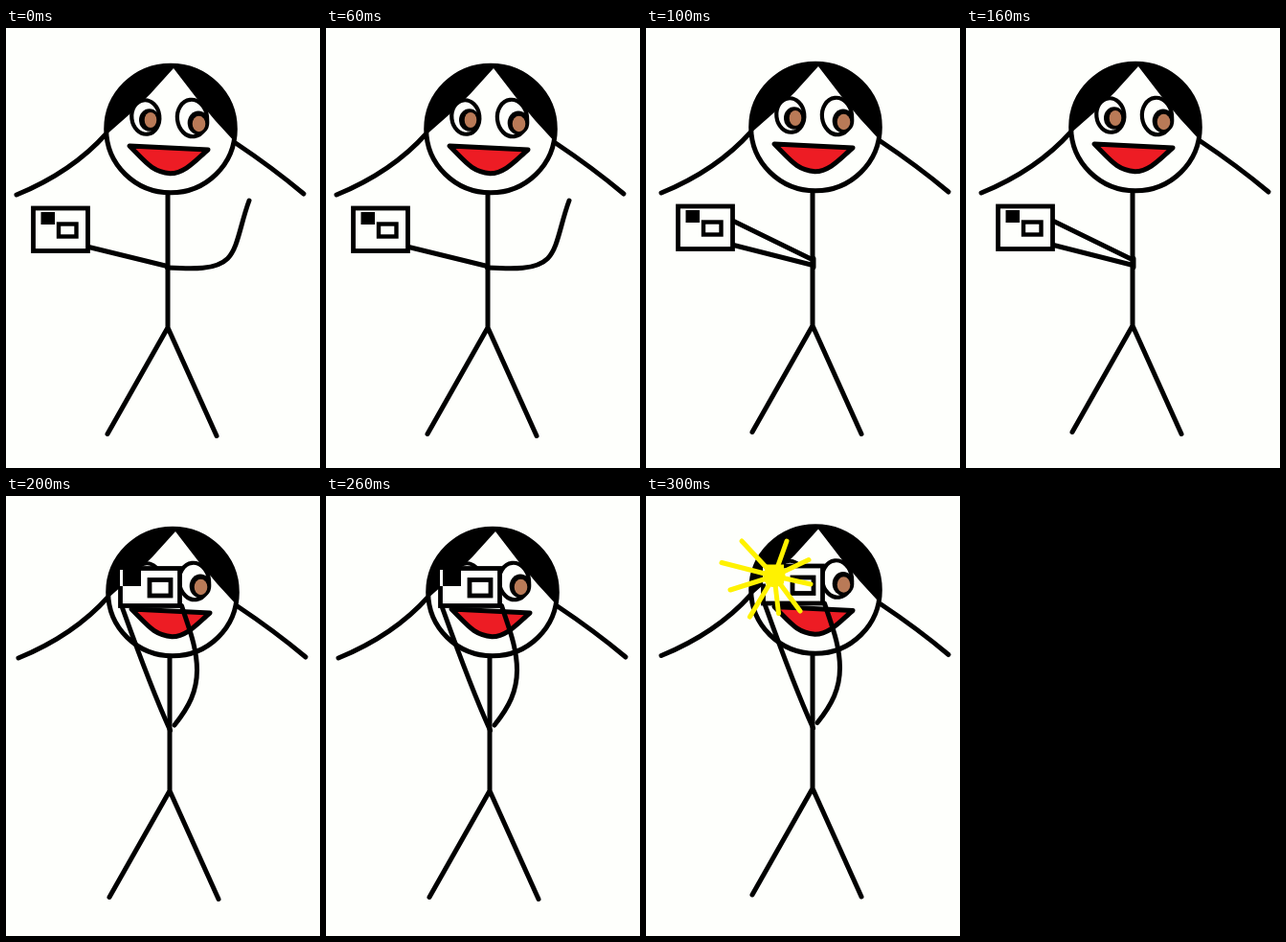
These frames come from a looping animation (328 px wide and 459 px high, 400 ms). An HTML page with a canvas:

```html
<!DOCTYPE html>
<html lang="en">
<head>
<meta charset="utf-8">
<title>Taking a snapshot</title>
<style>
  html, body { margin: 0; width: 100%; height: 100%; overflow: hidden; background: #fefffc; }
  canvas { display: block; }
</style>
</head>
<body>
<canvas id="stage" width="328" height="459"></canvas>
<script>
const ctx = document.getElementById('stage').getContext('2d');
const PAPER = '#fefffc', INK = '#000', RED = '#ed1c24', BROWN = '#b97a57', YELLOW = '#fff200';
const STEP = 100, LINE = 5;

// Body offset for each pose
const poses = [
  { x: 0.5, y: 0.5, arms: armsOpen },
  { x: 5.5, y: -1.5, arms: armsHolding },
  { x: 2.5, y: -4.5, arms: armsRaised },
  { x: 5.5, y: -7, arms: armsRaised, flash: true }
];

function stroke(path, width = LINE, color = INK) {
  ctx.lineWidth = width;
  ctx.strokeStyle = color;
  ctx.stroke(new Path2D(path));
}

function shape(path, fill, width = LINE) {
  ctx.fillStyle = fill;
  ctx.fill(new Path2D(path));
  if (width) stroke(path, width);
}

function oval(x, y, rx, ry, fill, width = 0, tilt = 0) {
  ctx.beginPath();
  ctx.ellipse(x, y, rx, ry, tilt, 0, Math.PI * 2);
  ctx.fillStyle = fill;
  ctx.fill();
  if (!width) return;
  ctx.lineWidth = width;
  ctx.strokeStyle = INK;
  ctx.stroke();
}

function rect(x, y, w, h, fill) {
  ctx.fillStyle = fill;
  ctx.fillRect(x, y, w, h);
}

function box(x, y, w, h, width = 4.8) {
  rect(x, y, w, h, PAPER);
  ctx.lineWidth = width;
  ctx.strokeStyle = INK;
  ctx.strokeRect(x, y, w, h);
}

function head() {
  oval(171.5, 105, 67.3, 66.3, PAPER, LINE);
  ctx.save();
  ctx.beginPath();
  ctx.ellipse(171.5, 105, 69, 68, 0, 0, Math.PI * 2);
  ctx.clip();
  shape('M174.5 41.5 L150 68.5 L128 90 L103 112 L90 30 L250 30 L242 122 L218 96 L198 72 Z', INK, 0);
  ctx.restore();

  oval(145.3, 92.5, 14.5, 17.8, PAPER, 4.2, -0.12);
  oval(149.3, 95.5, 10.8, 11.8, INK);
  oval(150.5, 95.5, 6.3, 8, BROWN);
  oval(194, 93.5, 15.6, 19.3, PAPER, 4.2, -0.12);
  oval(200.5, 98.5, 11.3, 12.5, INK);
  oval(201, 99.5, 6.8, 8.2, BROWN);
  shape('M128.5 122.5 L210.5 126.5 C198 137 187 151 171 151.3 C152 149.5 146 140 128.5 122.5 Z', RED);
}

function body() {
  stroke('M104 110 C78 139 46 159 10.5 173.5');
  stroke('M240 120 C264 136 286 152 310.5 172.5');
  stroke('M168.5 172 V312 L105.5 423 M168.5 312 L219.5 425');
}

function lowCamera() {
  box(28, 187.5, 57, 44.5);
  rect(36, 191.5, 14.5, 13, INK);
  box(54.5, 204, 18.5, 13, 4.4);
}

function armsOpen() {
  lowCamera();
  stroke('M86 228 L168 248');
  stroke('M168 249.5 C195 251 219 252 231 240 C242 229 244 205 253.5 179.5');
}

function armsHolding() {
  lowCamera();
  stroke('M86 203 L169 243.5 M86 228 L169 249 M169.5 242 V251');
}

function armsRaised(flash) {
  box(117, 80, 62, 39);
  rect(119.5, 78.5, 19, 20, flash ? YELLOW : INK);
  rect(116.5, 81.5, 3, 17, PAPER);
  box(147.5, 92, 22, 16.5);
  stroke('M119 121 C133 160 149 205 169 249');
  stroke('M181 119 C188 141 197 162 197 186 C197 208 189 224 173.5 243.5');
}

function flashBurst(x, y) {
  const tips = [[100, 47], [147, 47], [170, 66.5], [172, 92], [161, 120],
                [138.5, 122.5], [108.5, 126], [88, 98], [79, 69.5]];
  for (const [tx, ty] of tips) stroke(`M${x} ${y} L${tx} ${ty}`, LINE, YELLOW);
  oval(x, y, 11.5, 11.5, YELLOW);
}

function draw(time) {
  const pose = poses[Math.floor(time / STEP) % poses.length];
  rect(0, 0, 328, 459, PAPER);
  ctx.lineCap = ctx.lineJoin = 'round';
  ctx.save();
  ctx.translate(pose.x, pose.y);
  head();
  body();
  ctx.lineJoin = 'miter';
  pose.arms(pose.flash);
  ctx.restore();
  if (pose.flash) flashBurst(134, 83.5);
}

function tick() {
  draw(performance.now() - start);
  requestAnimationFrame(tick);
}

const start = performance.now();
tick();
</script>
</body>
</html>
```
